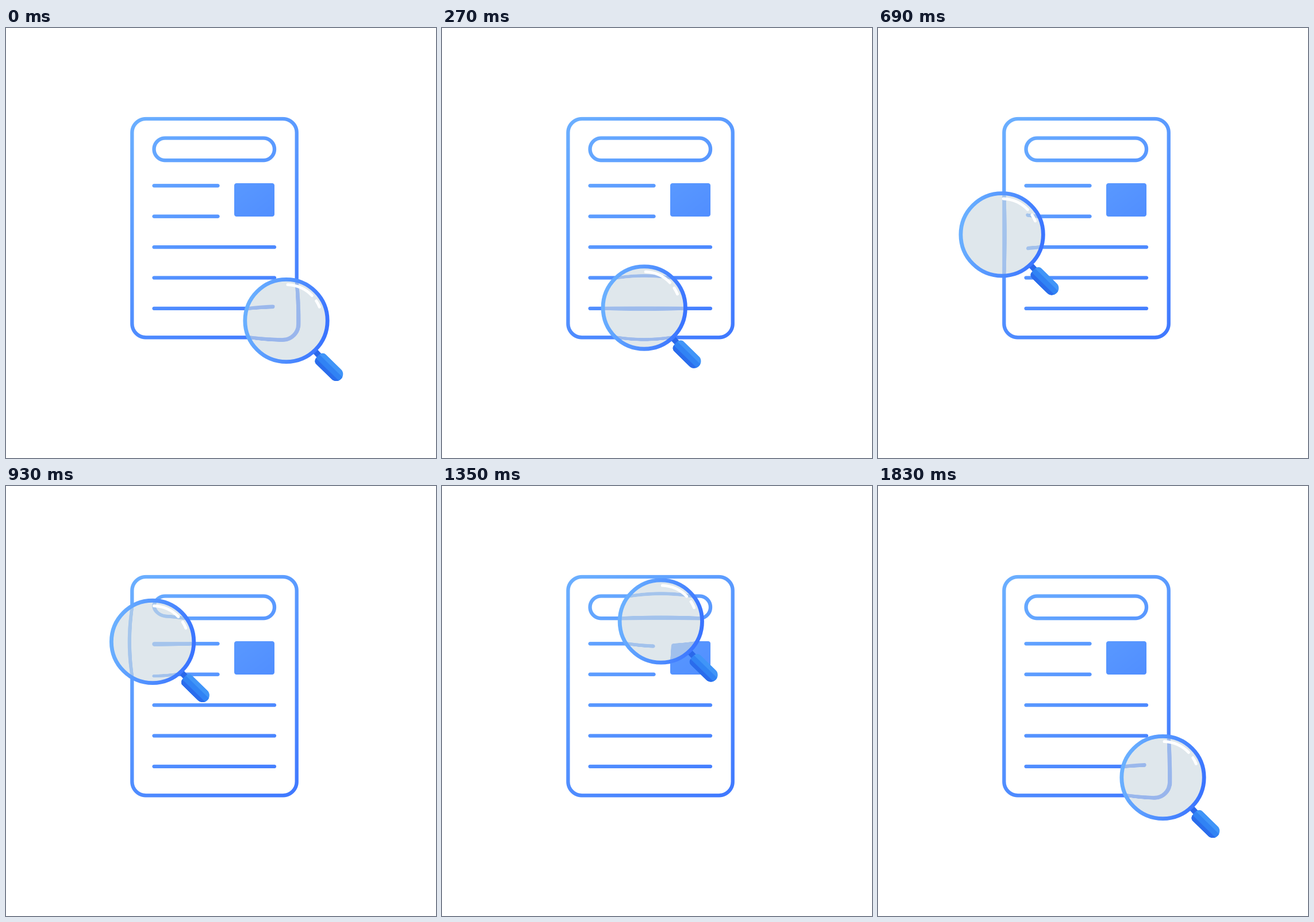
These frames come from a looping animation (748 by 748 pixels, 2010 ms). An HTML page with a canvas:

```html
<!DOCTYPE html>
<html lang="en">
<head>
<meta charset="utf-8">
<title>Document search</title>
<style>
  html, body { margin: 0; width: 100%; height: 100%; overflow: hidden; background: #fff; }
  canvas { display: block; }
</style>
</head>
<body>
<canvas id="stage" width="748" height="748"></canvas>
<script>
const SIZE = 748, LOOP = 2010, STEP = 30, LEG = 600, GLASS = 70, BULGE = 0.19;
const ctx = document.getElementById('stage').getContext('2d');

// One curve per leg of the lens's trip; each leg eases in and out.
const legs = [
  'M487.5 509 C428 525 215 455 215 371',
  'M215 371 C215 310 268 236 322 228',
  'M322 228 C460 216 538 404 495.5 507'
].map(d => {
  const path = document.createElementNS('http://www.w3.org/2000/svg', 'path');
  path.setAttribute('d', d);
  return path;
});

function lensAt(time) {
  const i = Math.min(Math.floor(time / LEG), legs.length - 1);
  const u = Math.min(time / LEG - i, 1);
  const eased = u * u * (3 - 2 * u);
  return legs[i].getPointAtLength(eased * legs[i].getTotalLength());
}

function gradient(c, x0, y0, x1, y1, from, to) {
  const g = c.createLinearGradient(x0, y0, x1, y1);
  g.addColorStop(0, from);
  g.addColorStop(1, to);
  return g;
}

function line(c, x0, y0, x1, y1) {
  c.beginPath();
  c.moveTo(x0, y0);
  c.lineTo(x1, y1);
  c.stroke();
}

function box(c, x, y, w, h, r) {
  c.beginPath();
  c.roundRect(x, y, w, h, r);
}

// The page is drawn once at double size so the lens can magnify it cleanly.
function makePage() {
  const canvas = document.createElement('canvas');
  canvas.width = canvas.height = SIZE * 2;
  const c = canvas.getContext('2d');
  c.scale(2, 2);
  c.fillStyle = '#fff';
  c.fillRect(0, 0, SIZE, SIZE);
  c.fillStyle = c.strokeStyle = gradient(c, 216, 155, 509, 541, '#6cb0ff', '#3f78ff');
  c.lineCap = 'round';
  c.lineWidth = 6.3;
  box(c, 219.3, 158, 286.4, 380.3, 24);
  c.stroke();
  box(c, 257.5, 191.5, 209.5, 38.7, 19.3);
  c.stroke();
  for (let i = 0; i < 5; i++) {
    const y = 274.3 + i * 53.4;
    line(c, 257.5, y, i < 2 ? 368.5 : 467, y);
  }
  box(c, 397, 270, 70, 58, 4);
  c.fill();
  return canvas;
}
const page = makePage();

// Shrinking discs with growing zoom add up to a smooth bulge.
function drawGlass() {
  for (let r = GLASS; r > 0; r--) {
    const zoom = 1 + BULGE * (1 - (r / GLASS) ** 2);
    ctx.save();
    ctx.beginPath();
    ctx.arc(0, 0, r, 0, 7);
    ctx.clip();
    ctx.scale(zoom, zoom);
    ctx.drawImage(page, -lens.x, -lens.y, SIZE, SIZE);
    ctx.restore();
  }
  ctx.fillStyle = 'rgba(204,217,225,.63)';
  ctx.beginPath();
  ctx.arc(0, 0, GLASS, 0, 7);
  ctx.fill();
}

function drawHandle() {
  ctx.lineCap = 'butt';
  ctx.lineWidth = 10;
  ctx.strokeStyle = '#2a68ea';
  line(ctx, 48, 51, 62, 66);
  ctx.save();
  ctx.translate(75, 81.5);
  ctx.rotate(0.775);
  box(ctx, -28, -12, 56.5, 24, [8, 12, 12, 8]);
  ctx.clip();
  [['#4095f8', -12], ['#3183f4', -4], ['#2a6cec', 5]].forEach(([color, y]) => {
    ctx.fillStyle = color;
    ctx.fillRect(-30, y, 60, 12 - y);
  });
  ctx.restore();
}

function arc(radius, from, to) {
  ctx.beginPath();
  ctx.arc(0, 0, radius, from, to);
  ctx.stroke();
}

let lens;
function draw(now) {
  const time = Math.floor(now % LOOP / STEP) * STEP;
  lens = lensAt(time);
  ctx.drawImage(page, 0, 0, SIZE, SIZE);
  ctx.save();
  ctx.translate(lens.x, lens.y);
  drawHandle();
  drawGlass();
  ctx.lineWidth = 6.8;
  ctx.strokeStyle = gradient(ctx, -70, -15, 70, 15, '#6ab0ff', '#3a74ff');
  arc(71.7, 0, 7);
  ctx.lineWidth = 5;
  ctx.lineCap = 'round';
  ctx.strokeStyle = '#fff';
  arc(62.5, -1.53, -0.77);
  arc(62.5, -0.58, -0.39);
  ctx.restore();
}

const start = performance.now();
function tick() {
  draw(performance.now() - start);
  requestAnimationFrame(tick);
}
tick();
</script>
</body>
</html>
```
